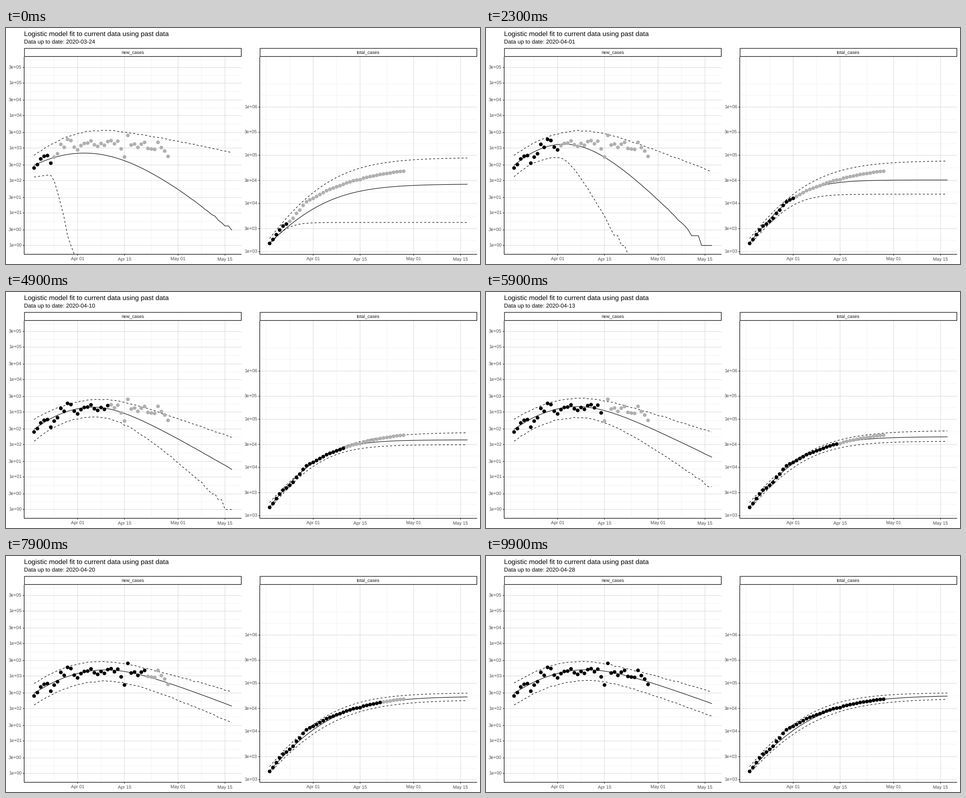
A matplotlib script that plays this animation: 1000x500 px, repeating every 10 s.

```python
import numpy as np
import matplotlib.pyplot as plt
from matplotlib.animation import FuncAnimation
from matplotlib.patches import Rectangle

W, H, DPI = 1000, 500, 100
PX = 72 / DPI                       # points per pixel
FRAMES, STATES = 100, 36
STEP = (FRAMES - 1) / (STATES - 1)  # frames per day of data
TOP, BOTTOM, WIDTH = 61, 479.5, 458.64
DAY = WIDTH / 1.1 / 59              # pixels per day
DAYS = np.arange(60)
GRID, AXIS_TEXT, FUTURE = "#DEDEDE", "#4D4D4D", "#B0B0B0"

plt.rcParams["font.family"] = "Liberation Sans"
plt.rcParams["text.hinting"] = "none"

# Observed cumulative cases, one value per day
TOTAL = np.array([
    1243, 1486, 1795, 2257, 2815, 3401, 3743, 4269, 4937, 6235, 7284, 9134,
    10836, 11899, 12775, 13964, 15348, 16770, 18431, 19691, 20814, 22194,
    23403, 24983, 26667, 28018, 29647, 30589, 31119, 33573, 34809, 36138,
    37183, 38496, 39983, 40956, 41889, 42797, 44293, 45325, 46134, 46687])


def new_y(v):
    return 460.7 - 68.8 * np.log10(v)


def total_y(v):
    return 780.4 - 102.15 * np.log10(v)


def key(state, *values):
    """Parameter that changes steadily between a few key states."""
    return np.interp(state, [0, 8, 12, 17, 24, 30], values)


def hill(start, day, peak, slope, bend):
    """Parabola up to the peak day, then a bend into a straight decline."""
    u = DAYS - day
    rise = (start - peak) * (u / day) ** 2
    fall = slope * (np.hypot(u, bend) - bend)
    return peak + np.where(u < 0, rise, fall)


def growth(start, end, rate, knee):
    """Steady growth that levels off after the knee day."""
    drop = np.log1p(np.exp(-rate * (DAYS - knee)))
    return end + (start - end) * drop / drop[0]


def surge(state):
    """The upper bound explodes while the data still look exponential."""
    return np.exp(-((state - 4) / 1.8) ** 2)


def new_curves(s):
    mid = hill(291, np.clip(12 + s / 3, 15, 21.5),
               key(s, 265, 246, 244.3, 244, 242, 241),
               key(s, 7, 8, 4.05, 4.3, 3.2, 2.7),
               key(s, 30, 19, 10.7, 12.6, 13, 13.3))
    lower = hill(316, key(s, 5, 13, 14.5, 18, 20, 22),
                 key(s, 312, 274, 267, 264.5, 267, 264),
                 key(s, 31, 13, 9.2, 7, 4, 2.8),
                 key(s, 1.2, 5.3, 21.4, 15.5, 12.8, 11.7))
    upper = hill(270, 20 + 23 * surge(s),
                 key(s, 218, 218.5, 225, 227.5, 223, 223.5) - 138 * surge(s),
                 key(s, 1.5, 2.8, 2.1, 2.6, 2.1, 2.05), 9)
    jitter = np.random.default_rng(s).normal(0, 0.5, (2, len(DAYS)))
    return mid, lower + jitter[0], upper + jitter[1]


def total_curves(s):
    mid = growth(455.5, key(s, 330.5, 322, 313.3, 313.3, 301.5, 295.5),
                 key(s, 0.106, 0.165, 0.145, 0.14, 0.107, 0.093), 12)
    lower = growth(460, key(s, 412, 352, 331, 323.5, 310.5, 302),
                   key(s, 0.37, 0.22, 0.165, 0.14, 0.1, 0.088),
                   min(12, 3 + 1.2 * s))
    upper = growth(446, key(s, 276, 282.5, 286, 297.5, 290.5, 289.5)
                   - 205 * surge(s), 0.103, 12 + 20 * surge(s))
    return mid, lower, upper


def whole_cases(y, keep_zero):
    """Snap heights to whole case counts; zero sits on the panel floor."""
    v = np.round(10 ** ((460.7 - y) / 68.8))
    floor = BOTTOM if keep_zero else np.nan
    return np.where(v > 0, new_y(np.maximum(v, 1)), floor)


fig = plt.figure(figsize=(W / DPI, H / DPI), dpi=DPI, facecolor="white")
ax = fig.add_axes([0, 0, 1, 1])
ax.set_xlim(0, W)
ax.set_ylim(H, 0)
ax.axis("off")


def rule(xs, ys, color, width, z):
    ax.plot(xs, ys, color=color, lw=width * PX, zorder=z, snap=False,
            solid_capstyle="butt")


def label(x, y, text, size, color="black", ha="left"):
    return ax.text(x, y, text, fontsize=size * PX, color=color, ha=ha,
                   va="baseline", zorder=7)


class Panel:
    def __init__(self, left, name, to_y, breaks, cases):
        self.left, self.right = left, left + WIDTH
        self.x0 = left + WIDTH / 22
        self.x = self.x0 + DAY * DAYS
        self.draw_grid(to_y, breaks)
        self.draw_axes(name, to_y, breaks)

        clip = Rectangle((left, TOP), WIDTH, BOTTOM - TOP,
                         transform=ax.transData)
        self.lines = []
        for style in ("-", (0, (4, 4)), (0, (4, 4))):
            line, = ax.plot([], [], color="black", lw=1.07 * PX, ls=style,
                            zorder=3, dash_capstyle="butt", snap=False)
            line.set_clip_path(clip)
            self.lines.append(line)
        self.dots = ax.scatter(self.x[:len(cases)], to_y(cases),
                               s=(7.8 * PX) ** 2, linewidths=0, zorder=4)

    def grid_line(self, major, x=None, y=None):
        color, width = (GRID, 1.16) if major else ("#F3F3F3", 1)
        xs = [self.left, self.right] if x is None else [x, x]
        ys = [TOP, BOTTOM] if y is None else [y, y]
        rule(xs, ys, color, width, int(major))

    def draw_grid(self, to_y, breaks):
        logs = np.log10(breaks)
        gap = logs[1] - logs[0]
        wide = np.concatenate([[logs[0] - gap], logs, [logs[-1] + gap]])
        minor = np.concatenate([wide[[0, -1]], (wide[1:] + wide[:-1]) / 2])
        for y in to_y(10 ** minor):
            if TOP < y < BOTTOM:
                self.grid_line(False, y=y)
        for day in (-1, 6, 20, 35, 50):
            self.grid_line(False, x=self.x0 + DAY * day)
        for b in breaks:
            self.grid_line(True, y=to_y(b))

    def draw_axes(self, name, to_y, breaks):
        left, right = self.left, self.right
        for b in breaks:
            y = to_y(b)
            rule([left - 3, left], [y, y], "#333333", 1.16, 6)
            label(left - 5.4, y + 3.4, f"{b:.0e}", 9.6, AXIS_TEXT, "right")
        for day, text in ((13, "Apr 01"), (27, "Apr 15"),
                          (43, "May 01"), (57, "May 15")):
            x = self.x0 + DAY * day
            self.grid_line(True, x=x)
            rule([x, x], [BOTTOM, BOTTOM + 3], "#333333", 1.16, 6)
            label(x, 493, text, 9.6, AXIS_TEXT, "center")
        rule([left, left], [TOP, BOTTOM], "black", 1.16, 6)
        rule([left, right], [BOTTOM, BOTTOM], "black", 1.16, 6)
        ax.add_patch(Rectangle((left + 0.6, 43.2), WIDTH - 1.2, 17.2,
                               fc="white", ec="black", lw=1.16 * PX,
                               zorder=6, snap=False))
        label((left + right) / 2, 55.2, name, 9.6, "#1A1A1A", "center")

    def show(self, curves, known):
        for line, y in zip(self.lines, curves):
            ok = np.isfinite(y)
            line.set_data(self.x[ok], y[ok])
        rest = len(TOTAL) - 1 - known
        self.dots.set_facecolor(["black"] * known + [FUTURE] * rest)


BREAKS = [m * 10 ** e for e in range(6) for m in (1, 3)]
new_panel = Panel(38.36, "new_cases", new_y, BREAKS, np.diff(TOTAL))
total_panel = Panel(535.36, "total_cases", total_y, BREAKS[6:] + [10 ** 6],
                    TOTAL[1:])
label(38.36, 17, "Logistic model fit to current data using past data", 14.4)
subtitle = label(38.36, 34, "", 12)

STARTS = np.round(np.arange(STATES) * STEP).astype(int)


def update(i):
    # The curves jump to the nearest state, the date is rounded down
    state = int(np.searchsorted(STARTS, i, "right")) - 1
    on_state = STARTS[state] == i
    new = [whole_cases(y, on_state) for y in new_curves(state)]
    new_panel.show(new, state + 6)
    total_panel.show(total_curves(state), state + 6)

    day = i * (STATES - 1) // (FRAMES - 1)
    date = np.datetime64("2020-03-24") + np.timedelta64(day, "D")
    subtitle.set_text(f"Data up to date: {date}")
    return []


anim = FuncAnimation(fig, update, frames=FRAMES, interval=100, repeat=True,
                     repeat_delay=0, init_func=lambda: update(0))
plt.show()
```
